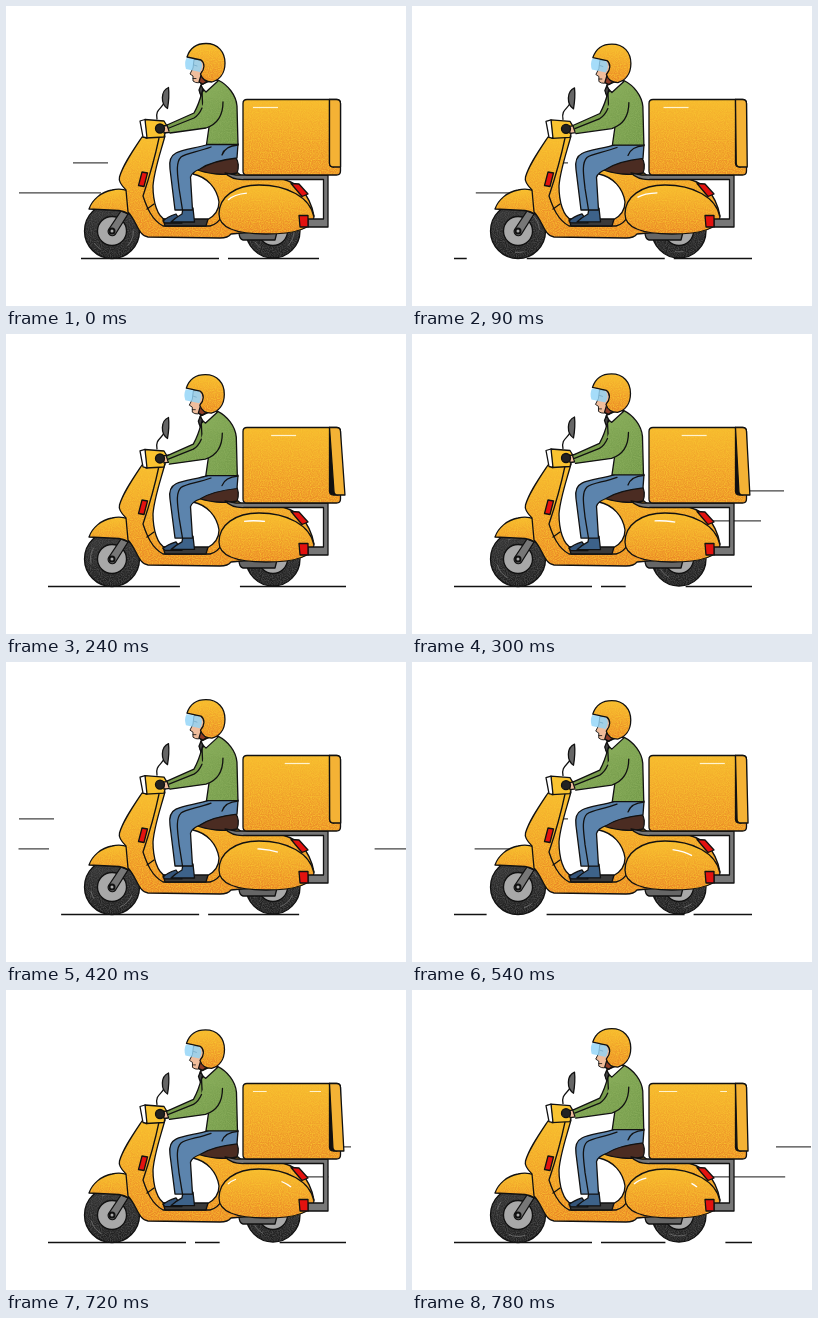
An HTML page that plays this animation: 400 by 300 pixels, repeating every 810 ms.

```html
<!DOCTYPE html>
<html lang="en">
<head>
<meta charset="utf-8">
<title>Delivery scooter</title>
<style>
  html, body { margin: 0; width: 100%; height: 100%; overflow: hidden; background: #fff; }
  svg { display: block; width: 400px; height: 300px; }
  .art { stroke: #111; stroke-width: 1.3; stroke-linejoin: round; stroke-linecap: round; fill: none; }
</style>
</head>
<body>
<svg id="stage" viewBox="0 0 400 300"></svg>
<script>
const YELLOW = '#f9c330', BLUE = '#5c84ad', GREEN = '#8aae5c', SKIN = '#f0bd9c', GREY = '#777', RED = '#e3120f';

const path = (d, fill = 'none', extra = '') => `<path d="${d}" fill="${fill}" ${extra}/>`;

// Flat fill, speckled shading, then the outline on top
const grained = (d, fill, shade, outline = d) =>
  path(d, fill, 'stroke="none"') +
  path(d, `url(#${shade})`, 'stroke="none" filter="url(#grain)"') +
  path(outline);

const gradient = (id, color, from, to, dir = 'x2="0" y2="1"') =>
  `<linearGradient id="${id}" ${dir}><stop stop-color="${color}" stop-opacity="${from}"/>` +
  `<stop offset="1" stop-color="${color}" stop-opacity="${to}"/></linearGradient>`;

const circleD = (x, y, r) => `M${x - r} ${y}a${r} ${r} 0 1 1 ${2 * r} 0a${r} ${r} 0 1 1 ${-2 * r} 0z`;

const wheel = (x, y, r) =>
  grained(circleD(x, y, r), '#505050', 'tyre') +
  `<g class="spin" data-c="${x} ${y}"><circle cx="${x}" cy="${y}" r="${r - 6}" stroke="#777" stroke-width=".7" stroke-dasharray="16 30 8 84"/></g>` +
  path(circleD(x, y, 14.5), '#a8a8a8');

const wheels =
  wheel(106, 225, 27.5) + wheel(267, 225, 27) +
  path('M103 223L115 205L122 208L109.500 228A4 4 0 0 1 103 223Z', GREY) +
  path(circleD(106, 225, 2.5), '#aaa', 'stroke-width="2"') +
  path('M233 226H271L269 234H237Q233 233 233 226Z', '#666');

const body =
  grained('M83 203C86 194 95 186 106 184Q115 182 122 185L130 215Q124 206 113 204.500Z', YELLOW, 'body') +
  grained('M120 184Q112 176 113.500 171C117 159 126 146 136 131L159 130C154 148 148 165 147 180' +
    'C147 195 151 211 160 214L201 214C209 210 213 203 213 196C211 182 201 171 187 168L190 163L232 167' +
    'L238 172H270C288 174 303 184 308 210L290 222L225 228Q222 232 214 232L142 231' +
    'C132 230 131 215 122 206Z', YELLOW, 'body') +
  path('M153 132C148 156 141 178 137 190C141 202 146 214 157 220H204Q212 218 216 210') +
  path('M141 203L148 198') +
  path('M157 213H202L200 220H159Z', '#3a3a3a') +
  path('M136 166L141.500 167L138 180.500L132.500 179.500Z', RED) +
  grained('M213 208C213 191 229 179 253 179C281 179 304 191 308 211C306 225 284 228 260 228C233 228 213 223 213 208Z', YELLOW, 'body') +
  path('M222 194C228 188 240 186 254 187C269 188 279 192 285 197', 'none',
    'id="coverShine" stroke="#fff" pathLength="68" stroke-dasharray="21 47" stroke-linecap="butt"') +
  path('M285 177.500L293 178L302 188L296 190.500Z', RED) +
  path('M189 163C196 155 215 153 229 151C233 155 233 162 231 167C220 170 201 168 189 163Z', '#4b2c22') +
  path('M219 167L230 169H322V221H302V213H317.500V173.500H238Q226 174 219 167Z', GREY) +
  path('M293 209.500H302V221H294Z', RED);

const legs =
  path('M157 215Q161 211 170 208L176 217H159Z', '#35557a') +
  path('M165 216Q169 212 176 208L177 202H187L188.500 216H166Z', '#3d6289') +
  path('M203 138C192 142 178 143 170 147C164 150 163 156 164 163L169 204H186.500L184.500 171Q186 166 194 163' +
    'C203 157 213 154 231 152L232 138Z', BLUE) +
  path('M205 141C192 146 180 147 175 151C169 157 172 171 173 182L176.500 204') +
  path('M232 139Q219 140 216 149');

const rider =
  path('M193 66L206 68L209 79L199 83L194 76Z', SKIN) +
  path('M161 119L188 107Q193 98 196 86L201 106L163 125Z', '#789c4c') +
  grained('M196 86L205 78L212 74C222 79 230 89 231 100L232 138.500H200.500L203 121L197 106Z', GREEN, 'cloth') +
  grained('M163 122L188 112Q195 106 200 90L217 96C217 107 212 118 200 122L164 127Z', GREEN, 'cloth',
    'M163 122L188 112Q193 109 196 102M164 127L200 122C212 118 217 108 217 96') +
  path('M195 79L208 73L212 75L200 86L197 83L194 87Z', '#fff') +
  path('M195 79L193 84L195 90L197 83Z', '#444') +
  path('M188 54L187 62L184 68L187 70L187 75Q192 79 198 74L199 54Z', SKIN, 'stroke-width=".9"') +
  path('M187 72.500H190M188 59L191 60', 'none', 'stroke-width=".8"') +
  path('M180.500 52L194 54Q198 59 194 66L180 63Q178 57 180.500 52Z', '#8fd3f7', 'stroke="none" fill-opacity=".8"') +
  path('M196 66L193 76L197 78L203 74Z', '#8e3c27') +
  grained('M181 51C184 42 191 37.500 200 37.500C212 37.500 219 46 219 57C219 68 213 74 206 76C200 76 196 73 194.500 68C199 63 199 57 195 54Z', YELLOW, 'body');

const handlebar =
  path('M151 113C149 103 156 103 158.500 96') +
  path('M162.500 81.500C154.500 85 154.500 98 161.500 102.500Q163.500 91 162.500 81.500Z', '#666') +
  path('M139 113.500L158 115L161 120L158 131L140 132Z', YELLOW) +
  path('M134 115L139 113.500L141 132L137 131Z', '#fff') +
  path('M157 120L164 119L166 126L158 127Z', SKIN) +
  path(circleD(154, 122.5, 4.5), '#222');

stage.innerHTML = `
  <defs>
    <filter id="grain" x="0" y="0" width="1" height="1" color-interpolation-filters="sRGB">
      <feTurbulence type="fractalNoise" baseFrequency=".9" numOctaves="1" seed="4"/>
      <feColorMatrix values="0 0 0 0 0  0 0 0 0 0  0 0 0 0 0  2 0 0 0 -.3"/>
      <feComposite in="SourceGraphic" operator="in"/>
    </filter>
    ${gradient('body', '#ea8526', .1, 1)}
    ${gradient('crate', '#ea8726', .15, .9)}
    ${gradient('tyre', '#111', .4, .8)}
    ${gradient('cloth', '#4f7a2c', 0, .4, 'x2="1" y2="1"')}
  </defs>
  <g class="art">
    <path id="road" stroke-width="1.5" stroke-linecap="butt"/>
    <path id="wind" stroke="#444" stroke-width="1.2" stroke-linecap="butt"/>
    ${wheels}
    ${body}
    <g id="crate">
      ${grained('M241 93.500H330.500Q334.500 93.500 334.500 97.500V165Q334.500 169 330.500 169H241Q237 169 237 165V97.500Q237 93.500 241 93.500Z', YELLOW, 'crate')}
      <path id="gap" fill="#111"/>
      <path id="flap" fill="#f4b235"/>
      <path id="crateShine" stroke="#fff4cf" stroke-width="1.2" stroke-linecap="butt"/>
    </g>
    <g id="legs">${legs}</g>
    <g id="bar">${handlebar}</g>
    <g id="rider">${rider}</g>
  </g>`;

const $ = id => document.getElementById(id);
const set = (id, name, value) => $(id).setAttribute(name, value);

// Horizontal stroke, cut to the range lo..hi
const dash = (from, to, y, lo, hi) => {
  const a = Math.max(from, lo), b = Math.min(to, hi);
  return b > a ? `M${a} ${y}H${b}` : '';
};

// 30 steps of motion play in 27 ticks: one is held, a few are skipped
const stepAt = ms => {
  const n = Math.floor(ms % 810 / 30);
  return n - (n > 0 && n < 8) + (n > 19);
};

function draw(k) {
  const bob = (1 - Math.cos(k * 2 * Math.PI / 15)) / 2;

  // Each road line grows from the left edge, then slides away with its small gap
  let road = '';
  for (let i = -1; i < 3; i++) {
    const head = 313 + (k / 15 - i) * 298, tail = Math.max(42, head - 238);
    road += dash(tail, Math.min(tail + 138, head), 252.4, 42, 340) + dash(tail + 147, head, 252.4, 42, 340);
  }
  set('road', 'd', road);

  const streak = (head, length, y) => dash(head - length, head, y, 12.5, 400);
  set('wind', 'd',
    streak(102 + 27 * k, 35, 156.8) + streak(48 + 27 * (k - 14), 35, 156.8) +
    streak(95 + 25.4 * k, 82, 186.8) + streak(43 + 25.4 * (k - 14), 82, 186.8));

  set('crate', 'transform', `translate(${2.5 * bob} ${2.2 * bob})`);
  const open = 4.5 * bob;
  set('gap', 'd', `M323.5 93.5V157Q323.5 161 327.5 161H${327.5 + open}Z`);
  set('flap', 'd', `M323.5 93.5H330.5Q334.5 93.5 334.5 97.5L${334.5 + open} 161H${327.5 + open}Q${323.5 + open} 161 ${323.5 + open} 157Z`);
  const shine = 247 + k * 68 / 30;
  set('crateShine', 'd', dash(shine, shine + 25, 101.5, 247, 315) + dash(shine - 68, shine - 43, 101.5, 247, 315));
  set('coverShine', 'stroke-dashoffset', -k * 68 / 30);

  set('rider', 'transform', `translate(${-.7 * bob} ${3.2 * bob})`);
  set('bar', 'transform', `translate(0 ${2 * bob})`);
  set('legs', 'transform', `translate(0 ${205 * 3.2 * bob / 67}) scale(1 ${1 - 3.2 * bob / 67})`);
  for (const el of document.querySelectorAll('.spin'))
    el.setAttribute('transform', `rotate(${-24 * k} ${el.dataset.c})`);
}

function tick() {
  draw(stepAt(performance.now()));
  requestAnimationFrame(tick);
}
tick();
</script>
</body>
</html>
```
